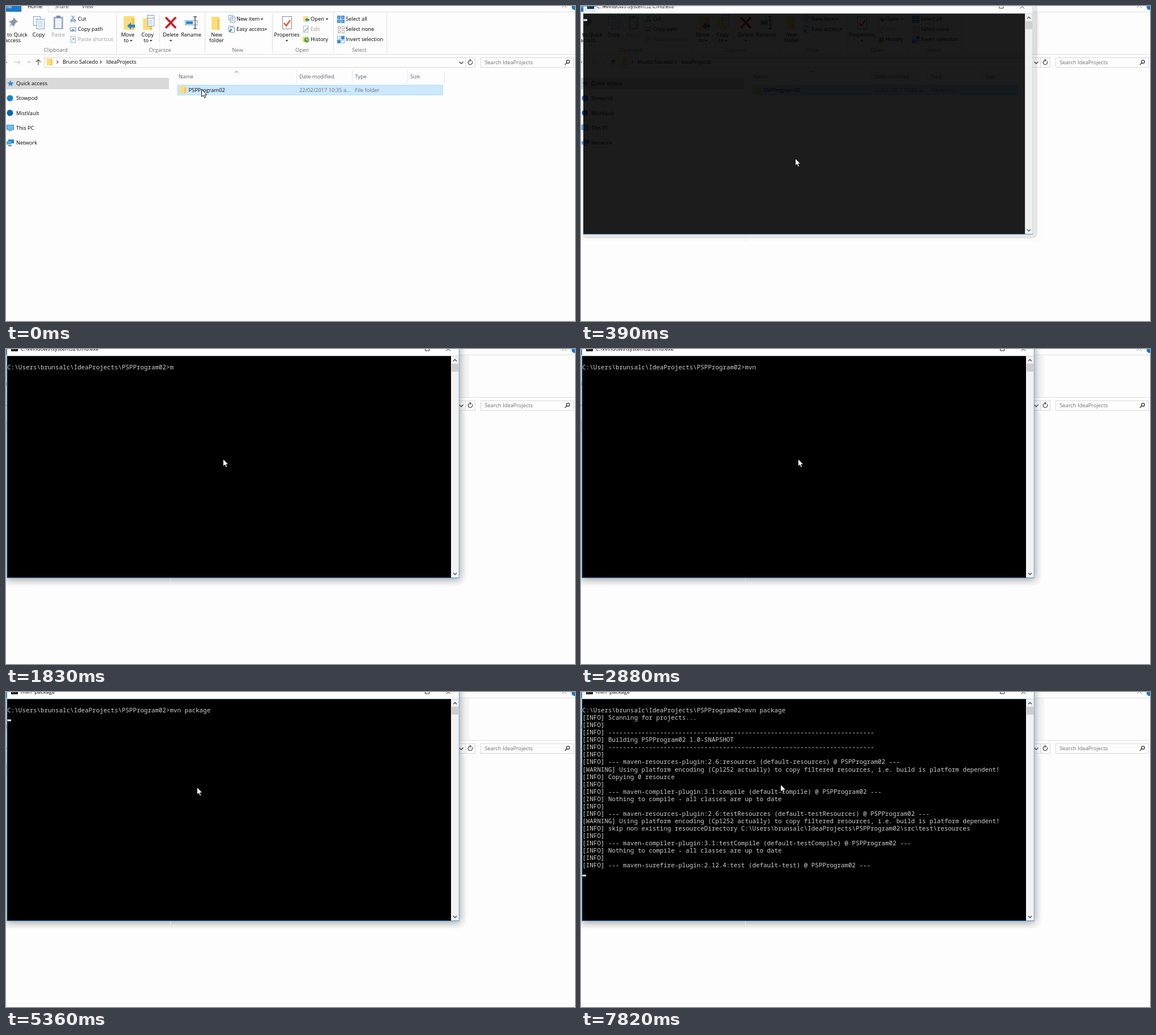
Animation of 1005x557 px, one loop 8 s. Source, as an HTML page with a canvas:

```html
<!DOCTYPE html>
<html lang="en">
<head>
<meta charset="utf-8">
<title>Maven build</title>
<style>
html, body { margin: 0; width: 100%; height: 100%; overflow: hidden; background: #fdfdfd; }
canvas { display: block; }
</style>
</head>
<body>
<canvas id="stage" width="1005" height="557"></canvas>
<script>
const c = document.getElementById('stage').getContext('2d');
const UI = '"Open Sans", "Noto Sans", sans-serif';
const MONO = '10.88px "Noto Sans Mono", "DejaVu Sans Mono", monospace';
const LOOP = 8000, CHAR = 6.53, LINE = 13.07;
const INK = '#000', GREY = '#6d6d6d', PALE = '#9a9a9a', EDGE = '#dfdfdf', BLUE = '#1979ca', GOLD = '#ffdc78';

const rect = (x, y, w, h, color) => { c.fillStyle = color; c.fillRect(x, y, w, h); };
const frame = (x, y, w, h, color) => { c.lineWidth = 1; c.strokeStyle = color; c.strokeRect(x + .5, y + .5, w, h); };
function fill(d, color) { c.fillStyle = color; c.fill(new Path2D(d)); }
function line(d, color, width = 1) { c.strokeStyle = color; c.lineWidth = width; c.stroke(new Path2D(d)); }
function dot(x, y, r, color) { c.fillStyle = color; c.beginPath(); c.arc(x, y, r, 0, 7); c.fill(); }
function round(x, y, w, h, r, color) { c.fillStyle = color; c.beginPath(); c.roundRect(x, y, w, h, r); c.fill(); }
// y is the middle of the lettering
function text(s, x, y, color = INK, align = 'left', size = 9.3) {
  c.font = size + 'px ' + UI;
  c.textAlign = align;
  c.fillStyle = color;
  c.fillText(s, x, y + 3.3);
}
const mid = (s, x, y, color) => text(s, x, y, color, 'center');
const drop = (x, y) => fill(`M${x - 2.5} ${y - 1}h5l-2.5 3z`, '#444');
function page(x, y, w, h, color = '#7d9cb8') { rect(x, y, w, h, '#fff'); frame(x, y, w - 1, h - 1, color); }
function folder(x, y, w, h) {
  rect(x, y, w, h, GOLD);
  rect(x + w * .75, y + h * .15, w * .25, h * .85, '#f3c552');
}

function tabs() {
  rect(0, 0, 27, 10, BLUE);
  text('File', -4, 1, '#fff');
  text('Home', 38, 1);
  text('Share', 86, 1, '#444');
  text('View', 134, 1, '#444');
  line('M0 10.5H27.5V0M74.5 0V10.5H1005M0 85.5H1005', EDGE);
  line('M982 3l4-4 4 4', '#888');
  dot(1004, 2, 5, BLUE);
}

function ribbon() {
  for (const x of [195, 351, 470, 578, 672]) rect(x, 12, 1, 71, EDGE);
  rect(271, 16, 1, 48, EDGE);

  text('Pin to Quick', 38, 51, INK, 'right');
  text('access', 26, 61, INK, 'right');
  fill('M13 20l8 8-3 1-3 4-1 4-4-4-5 5 4-7-4-4 5-1 3-3z', '#8b98a5');
  mid('Copy', 57.5, 51);
  page(48, 18, 13, 17); page(54, 23, 14, 18);
  line('M51 23h6M57 28h8M57 31h8M57 34h8M57 37h8', '#7fb2e0');
  mid('Paste', 92, 51, PALE);
  rect(84, 19, 17, 22, '#9fb0c8'); rect(87, 22, 11, 17, '#eef2f8'); rect(89, 17, 7, 4, '#7d8da5');
  line('M116 17l6 9M121 17l-6 9', '#566');
  line('M114 26a2 2 0 1 0 4 0a2 2 0 1 0-4 0M119 26a2 2 0 1 0 4 0a2 2 0 1 0-4 0', '#2f7fc4');
  text('Cut', 127, 23);
  page(113, 38, 11, 7); line('M115 42l1.5 2 1.5-3 1.5 3 2-3', '#1d5f9c');
  text('Copy path', 127, 41);
  page(114, 53, 9, 12, '#9fb0c8'); line('M116 61l4-4m-3 0h3v3', '#6d8fb8');
  text('Paste shortcut', 127, 59, PALE);

  mid('Move', 215, 51); text('to', 208, 61); drop(221, 61);
  folder(208, 18, 19, 24);
  fill('M214 35l7-6v4h7v5h-7v4z', '#2787d0');
  mid('Copy', 250, 51); text('to', 243, 61); drop(256, 61);
  page(249, 16, 13, 16); folder(242, 22, 16, 20); page(250, 21, 12, 15);
  line('M252 26h7M252 29h7M252 32h7', '#7fb2e0');
  mid('Delete', 291, 51); drop(291, 61);
  line('M282 20l18 19M300 20l-18 19', '#d9121e', 3.6);
  mid('Rename', 327, 51);
  page(316, 25, 22, 9); rect(318, 27, 12, 5, '#2d83cc');
  line('M331 19h6M334 19V40M331 40h6', '#555', 1.5);

  mid('New', 372, 51); mid('folder', 372, 61);
  folder(363, 19, 14, 23);
  page(393, 16, 8, 9); page(396, 19, 9, 10); line('M398 22h4M398 25h4', '#2d83cc');
  text('New item', 407, 23); drop(452, 23);
  page(393, 35, 8, 9); page(396, 37, 8, 10); line('M394 46l5-5', '#2d83cc', 2);
  text('Easy access', 407, 41); drop(459, 41);

  mid('Properties', 496, 51); drop(496, 61);
  page(488, 18, 17, 23, '#888'); line('M491 30l4 5 7-10', '#e2562d', 2.5);
  folder(525, 18, 9, 10); fill('M528 24l4-3v2h4v3h-4v2z', '#2787d0');
  text('Open', 538, 23); drop(567, 23);
  page(525, 35, 9, 12, '#aab8c8'); line('M527 45l7-7', '#9fb0c8', 2);
  text('Edit', 538, 41, PALE);
  folder(524, 54, 9, 10); dot(531, 60, 4.5, '#5a9e48'); line('M531 57v3h3', '#fff');
  text('History', 538, 59);

  for (let i = 0; i < 4; i++) {
    const dx = (i & 1) * 7, dy = (i >> 1) * 7;
    rect(585 + dx, 17 + dy, 6, 6, '#3b8fd4'); rect(587 + dx, 19 + dy, 2, 2, '#9fd0f4');
    frame(586 + dx, 36 + dy, 4, 4, '#a5a5a5');
    if (i === 1 || i === 2) rect(585 + dx, 53 + dy, 6, 6, '#3b8fd4');
    else frame(585 + dx, 53 + dy, 5, 5, '#7aaed8');
  }
  text('Select all', 600, 23);
  text('Select none', 600, 41);
  text('Invert selection', 600, 59);

  [['Clipboard', 88], ['Organize', 272], ['New', 409], ['Open', 523], ['Select', 624]]
    .forEach(([s, x]) => mid(s, x, 78, GREY));
}

function addressBar() {
  rect(0, 99, 2, 1, '#333');
  line('M15 99.5h10M21 96l4 3.5-4 3.5', '#bbb');
  line('M38 98l2.5 2.5 2.5-2.5', '#888');
  line('M57 104.5V95M53 99l4-4 4 4', '#555', 1.3);
  frame(67, 91, 744, 17, '#d9d9d9');
  folder(72, 93, 10, 12);
  line('M89.5 96.5l2.5 2.5-2.5 2.5M166 96.5l2.5 2.5-2.5 2.5', '#555', 1.2);
  text('Bruno Salcedo', 100, 99);
  text('IdeaProjects', 177, 99);
  line('M800.5 98.5l3.5 3.5 3.5-3.5', '#444', 1.4);
  frame(811, 91, 17, 17, '#d9d9d9');
  line('M823 97.5a3.8 3.8 0 1 1-3-1.5M819 94l2.5 2-2.5 2', '#444', 1.2);
  frame(838, 91, 164, 17, '#d9d9d9');
  text('Search IdeaProjects', 845.5, 99.5, GREY);
  line('M990 98.5a2.7 2.7 0 1 0 5.4 0a2.7 2.7 0 1 0-5.4 0M990.5 100.5l-3.5 3.5', '#333', 1.3);
}

function sidebar() {
  rect(0, 127, 288, 20, '#d9d9d9');
  fill('M8 131l1.6 4 4.2.2-3.2 2.7 1.2 4.2L8 139.8l-3.8 2.3 1.2-4.2-3.2-2.7 4.2-.2z', '#2b8ad6');
  dot(7, 163, 5.5, '#1683d8');
  dot(7, 189, 5.5, '#0a64b8');
  rect(1, 210, 13, 9, '#2787d0'); rect(2, 211, 11, 7, '#6cc0f0'); rect(4, 220, 7, 1, '#4a6f90');
  rect(4, 236, 10, 7, '#2787d0'); rect(1, 239, 8, 6, '#5aa9e2'); rect(4, 246, 6, 2, '#6b7f90');
  ['Quick access', 'Stowpod', 'MistVault', 'This PC', 'Network']
    .forEach((s, i) => text(s, 18, 137 + i * 26.1));
}

function fileList() {
  for (const x of [513, 611, 709, 774]) rect(x, 114, 1, 22, '#e5e5e5');
  line('M404 118l3-3 3 3', '#777');
  [['Name', 305], ['Date modified', 518], ['Type', 616.5], ['Size', 714]]
    .forEach(([s, x]) => text(s, x, 125, '#56606e'));
  rect(303, 139.6, 468.6, 18, '#99d1ff');
  rect(303.8, 140.4, 467, 16.4, '#cce8ff');
  folder(307, 142, 11, 12);
  text('PSPProgram02', 322.5, 148.5);
  text('22/02/2017 10:35 a...', 518, 148.5, GREY);
  text('File folder', 616.5, 148.5, GREY);
}

function explorer() {
  rect(0, 0, 1005, 557, '#fdfdfd');
  tabs(); ribbon(); addressBar(); sidebar(); fileList();
}

const PROMPT = 'C:\\Users\\brunsalc\\IdeaProjects\\PSPProgram02>';
const RULE = '-'.repeat(72);
const ENCODING = '[WARNING] Using platform encoding (Cp1252 actually) to copy filtered resources, i.e. build is platform dependent!';
const goal = s => `--- maven-${s} @ PSPProgram02 ---`;
const OUTPUT = [
  'Scanning for projects...', '', RULE, 'Building PSPProgram02 1.0-SNAPSHOT', RULE, '',
  goal('resources-plugin:2.6:resources (default-resources)'), ENCODING, 'Copying 0 resource', '',
  goal('compiler-plugin:3.1:compile (default-compile)'), 'Nothing to compile - all classes are up to date', '',
  goal('resources-plugin:2.6:testResources (default-testResources)'), ENCODING,
  'skip non existing resourceDirectory C:\\Users\\brunsalc\\IdeaProjects\\PSPProgram02\\src\\test\\resources', '',
  goal('compiler-plugin:3.1:testCompile (default-testCompile)'), 'Nothing to compile - all classes are up to date', '',
  goal('surefire-plugin:2.12.4:test (default-test)')
].map(s => s[0] === '[' ? s : '[INFO] ' + s);

// Timelines: [start, value...], each held until the next
const MOUSE = [[0, 345, 147], [130, 359, 196], [260, 373, 250], [390, 378, 269], [520, 377, 301],
  [650, 378, 285], [780, 380, 261], [910, 382, 235], [1040, 383, 214], [1170, 383, 194],
  [4970, 360, 181], [5100, 337, 168], [5490, 348, 168], [5750, 353, 164], [7670, 352, 163]];
const TYPED = [[0, 0], [1830, 1], [2220, 2], [2350, 3], [2480, 4], [3010, 5], [3140, 6],
  [3400, 7], [3530, 8], [3660, 9], [3920, 10], [4050, 11]];
const ROWS = [[0, -1], [780, 0], [4570, 1], [6410, 2], [6540, 5], [6670, 6], [6950, 8], [7360, 12], [7820, 22]];
const CARET = [[0, 1], [780, 0], [1960, 1], [2220, 0], [2480, 1], [2880, 0], [3140, 1], [3400, 0], [3660, 1],
  [3920, 0], [4180, 1], [4440, 0], [4570, 1], [4970, 0], [5100, 1], [5490, 0], [6010, 1]];
const at = (keys, t) => keys.findLast(k => k[0] <= t).slice(1);

function shadow(opening) {
  if (opening) {
    rect(798, 11, 11, 75, 'rgba(0,0,0,.045)');
    round(-10, 86, 823, 330, 2, 'rgba(0,0,0,.008)');
    round(2, -20, 804, 431, 9, 'rgba(0,0,0,.085)');
  } else {
    rect(800, 11, 18, 74, '#f5f5f5');
    round(-20, 109, 832, 308, 12, 'rgba(0,0,0,.025)');
    c.save();
    c.shadowColor = 'rgba(0,0,0,.4)';
    c.shadowBlur = 13;
    c.shadowOffsetY = 2;
    rect(1, -20, 800, 425, '#fff');
    c.restore();
  }
  rect(290, 404, 1, 12, '#e6e6e6');
}

function windowFrame(title) {
  rect(1.4, -20, 799.2, 425, '#2a86d2');
  rect(2.2, -20, 797.6, 32.5, '#fff');
  rect(9, -5, 12, 9, '#111');
  text('C:\\', 10.5, -1, '#fff', 'left', 6);
  text(title, 26, -.3, INK, 'left', 9.45);
  line('M701 -.8h9M740.5 -5v8h7v-8M777.5 -4l7.5 7.5M785 -4l-7.5 7.5', '#222');
  rect(2.2, 12.5, 784, 391.6, '#000');
  rect(786, 12.5, 13.8, 391.6, '#f2f2f2');
  rect(787, 26, 12, 14, '#cdcdcd');
  line('M790 21.5l3-3 3 3M790 396l3 3 3-3', '#444', 1.4);
}

function terminal(t) {
  const [rows] = at(ROWS, t), [typed] = at(TYPED, t);
  const prompt = PROMPT + 'mvn package'.slice(0, typed);
  windowFrame(t < 4570 ? 'C:\\Windows\\system32\\cmd.exe' : 'mvn  package');
  c.font = MONO;
  c.textAlign = 'left';
  c.fillStyle = '#d0d0d0';
  if (rows >= 0) [prompt, ...OUTPUT].slice(0, Math.max(rows, 1))
    .forEach((s, i) => c.fillText(s, 2.3, 36 + i * LINE));
  if (at(CARET, t)[0]) {
    const column = rows === 0 ? prompt.length : 0;
    rect(2.5 + column * CHAR, 35.5 + rows * LINE, CHAR, 3, '#fff');
  }
}

function mouse(t) {
  const [x, y] = at(MOUSE, t);
  const arrow = `M${x + .5} ${y + .5}v13l3-2.7 2 4.7 2.2-1-2-4.4h4z`;
  fill(arrow, '#fff');
  line(arrow, '#000', .9);
}

// The window alone on a clear layer, so that it can fade in as one piece
const layer = document.createElement('canvas');
function windowLayer(t) {
  layer.width = 1005;
  layer.height = 557;
  const keep = c.getImageData(0, 0, 1005, 557);
  terminal(t);
  layer.getContext('2d').drawImage(c.canvas, 2, 0, 798, 405, 2, 0, 798, 405);
  c.putImageData(keep, 0, 0);
  return layer;
}

function draw() {
  const t = performance.now() % LOOP, opening = t < 520;
  explorer();
  if (t >= 390) {
    shadow(opening);
    if (opening) {
      const view = windowLayer(t);
      c.globalAlpha = .88;
      c.drawImage(view, 2, 1, 1005 * .995, 557 * .995);
      c.globalAlpha = 1;
    } else terminal(t);
  }
  mouse(t);
  requestAnimationFrame(draw);
}

draw();
</script>
</body>
</html>
```
